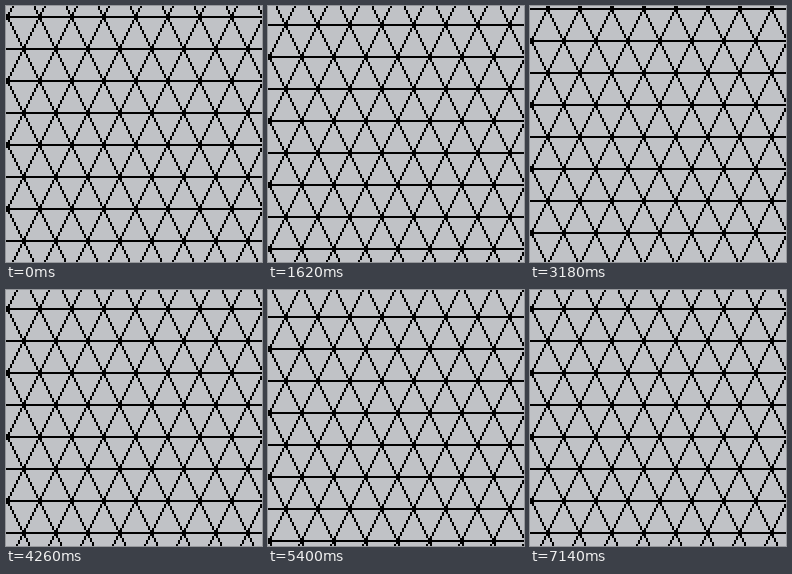
An HTML page with a canvas for the animation above (7170 ms loop, 256 px wide and 256 px high).

```html
<!DOCTYPE html>
<html lang="en">
<head>
<meta charset="utf-8">
<title>Triangle grid</title>
<style>
  html, body { margin: 0; width: 100%; height: 100%; overflow: hidden; background: #c0c2c6; }
  canvas { display: block; width: 100vw; height: 100vh; image-rendering: pixelated; }
</style>
</head>
<body>
<canvas id="grid" width="256" height="256"></canvas>
<script>
  const SIZE = 128;        // cells per side, each cell is 2 x 2 pixels
  const STEP = 16;         // distance between rows and between nodes
  const STEP_MS = 30;
  const LOOP_MS = 7170;
  const RISE = 2;          // cells moved up per step
  const START_ROW = 5;

  const ctx = document.getElementById('grid').getContext('2d');
  const mod = (n, m) => ((n % m) + m) % m;
  const dot = (x, y, w = 1) => ctx.fillRect(x * 2, y * 2, w * 2, 2);

  function draw(step) {
    ctx.fillStyle = '#c0c2c6';
    ctx.fillRect(0, 0, 256, 256);
    ctx.fillStyle = '#000';
    for (let y = 0; y < SIZE; y++) {
      const row = mod(y - START_ROW + RISE * step, STEP * 2);
      if (row % STEP === 0) dot(0, y, SIZE);
      // The two slopes mirror each other about the horizontal lines.
      const right = mod(Math.floor((row + 1) / 2), STEP);
      const left = mod(-Math.floor(row / 2), STEP);
      for (let x = 0; x < SIZE; x += STEP) {
        dot(x + right, y);
        dot(x + left, y);
      }
    }
  }

  const start = performance.now();
  let shown = -1;

  function tick() {
    const time = (performance.now() - start) % LOOP_MS;
    const step = Math.floor(time / STEP_MS);
    if (step !== shown) draw(shown = step);
    requestAnimationFrame(tick);
  }
  tick();
</script>
</body>
</html>
```
